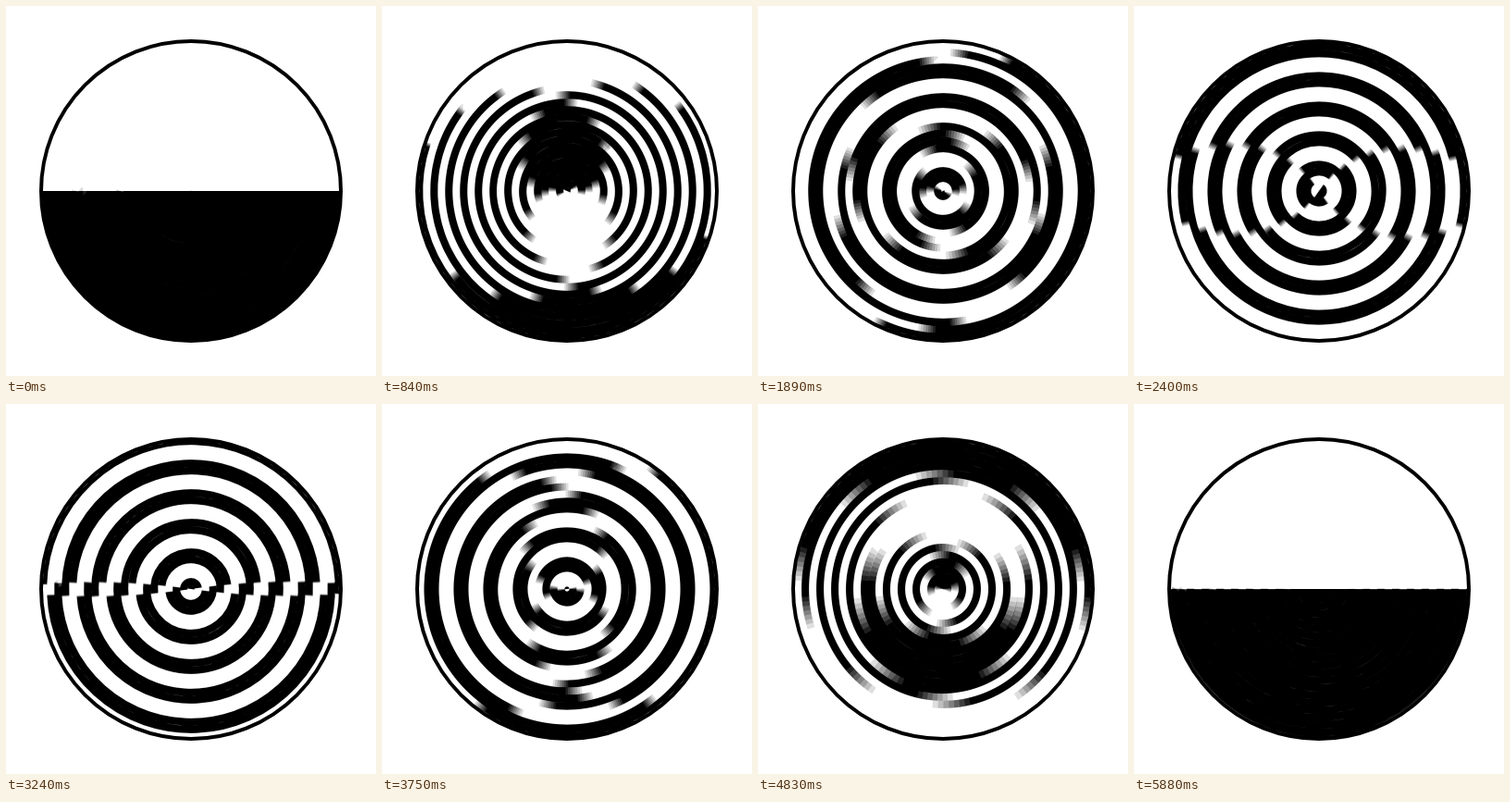
Write an HTML page with a canvas that moves like this. It is 400 px wide and 400 px high and loops after 6 s.

```html
<!DOCTYPE html>
<html lang="en">
<head>
<meta charset="utf-8">
<title>Turning rings</title>
<style>
  html, body { margin: 0; width: 100%; height: 100%; overflow: hidden; background: #fff; }
  canvas { display: block; }
</style>
</head>
<body>
<canvas id="stage" width="400" height="400"></canvas>
<script>
const ctx = document.getElementById('stage').getContext('2d');
const LOOP = 6000, HALF = LOOP / 2, STEP = 30;
const RADIUS = 160, RING = 8, DRIFT = 80, SAMPLES = 8;

const ease = p => p < 0.5 ? 4 * p ** 3 : 1 - 4 * (1 - p) ** 3;

function halfRing(inner, angle) {
  const a = Math.max(0, inner), b = Math.min(RADIUS, inner + RING);
  if (b <= a) return;
  ctx.lineWidth = b - a;
  ctx.beginPath();
  ctx.arc(200, 200, (a + b) / 2, angle, angle + Math.PI);
  ctx.stroke();
}

// Pairs of counter-rotating rings drift outwards; inner pairs make more half turns.
function drawRings(time) {
  const t = time % LOOP;
  const halfTurns = Math.floor(t / HALF) + ease(t % HALF / HALF);
  for (let k = -5; k < 10; k++) {
    const r = k * 2 * RING + DRIFT * t / LOOP;
    const angle = (10 - k) * Math.PI * halfTurns;
    halfRing(r, angle);
    halfRing(r + RING, -angle);
  }
}

function draw(time) {
  ctx.clearRect(0, 0, 400, 400);
  ctx.globalCompositeOperation = 'lighter';
  // Motion blur: average several moments of one step.
  ctx.globalAlpha = 1 / SAMPLES;
  for (let i = 0; i < SAMPLES; i++) {
    drawRings(time + STEP * (1 + (i + 0.5) / SAMPLES));
  }
  ctx.globalAlpha = 1;
  ctx.lineWidth = 4;
  ctx.beginPath();
  ctx.arc(200, 200, RADIUS + 2, 0, 2 * Math.PI);
  ctx.stroke();
}

const start = performance.now();
let shown = -1;

function tick() {
  const time = Math.max(0, performance.now() - start) % LOOP;
  const step = Math.floor(time / STEP);
  if (step !== shown) draw(step * STEP);
  shown = step;
  requestAnimationFrame(tick);
}
tick();
</script>
</body>
</html>
```
